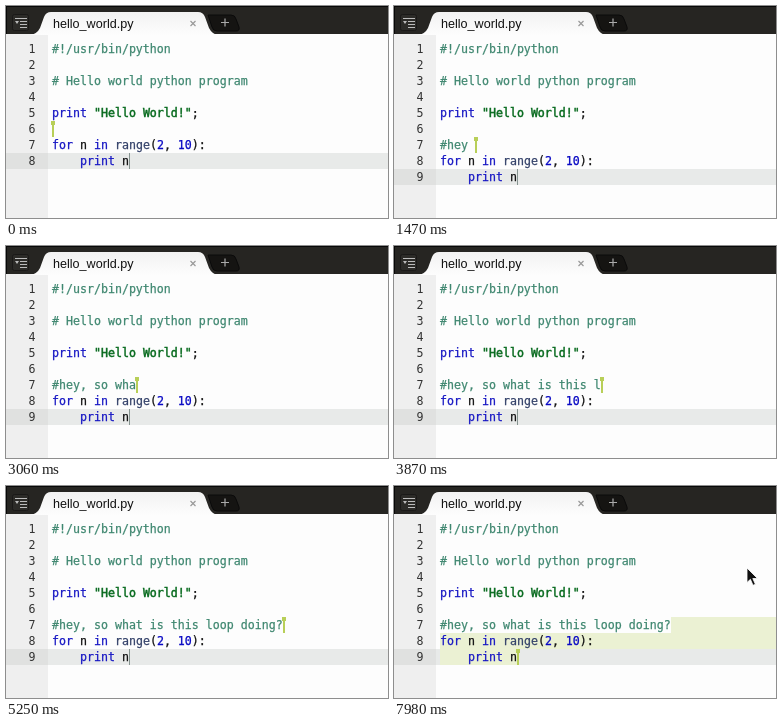
An HTML page for the animation above (8000 ms loop, 382 px wide and 212 px high).

```html
<!DOCTYPE html>
<html lang="en">
<head>
<meta charset="utf-8">
<title>Shared code editor</title>
<style>
  html, body { margin: 0; height: 100%; overflow: hidden; background: #fdfdfd; }
  svg { display: block; width: 382px; height: 212px; }
  text { white-space: pre; }
  .code text { font: 11.628px "DejaVu Sans Mono", monospace; }
  .line, .line tspan { fill: currentColor; stroke: currentColor; stroke-width: .25; }
  .line { color: #111; }
  .number { text-anchor: end; fill: #333; }
  .title { font: 12.6px "Liberation Sans", Arial, sans-serif; fill: #111; }
  .comment { color: #3f8770; }
  .keyword { color: #1818c4; }
  .line .string { color: #05691c; stroke-width: .45; }
  .digit { color: #0a0ac4; }
  .builtin { color: #34426a; }
  .selection { fill: #ebf1d3; }
  .remote { fill: #b8cf58; }
</style>
</head>
<body>
<svg viewBox="0 0 382 212">
  <defs>
    <linearGradient id="tab" x2="0" y2="1">
      <stop stop-color="#f2f2f2"/><stop offset="1" stop-color="#fdfdfd"/>
    </linearGradient>
  </defs>

  <rect width="382" height="212" fill="#fdfdfd"/>
  <rect y="28" width="42" height="184" fill="#efefef"/>
  <g id="active">
    <rect width="42" height="16" fill="#e0e1e0"/>
    <rect x="42" width="340" height="16" fill="#e8eae9"/>
  </g>
  <g id="selection" class="selection"></g>
  <g id="code" class="code"></g>
  <rect id="caret" x="123" width="1" height="16" fill="#869490"/>
  <path id="remote" class="remote" d="M-1 0h4v4h-1v12h-2v-12h-1z"/>

  <rect width="382" height="28" fill="#262522"/>
  <path d="M0 .5H382M.5 0V28" stroke="#080808"/>
  <path d="M202 9H225Q229 9 230 13L233 21Q234 25 230 25H211Q207 25 206 21Z" fill="#151412" stroke="#0a0a0a"/>
  <path d="M215 16.500h8M219 12.500v8" stroke="#aaa" stroke-width="1.200"/>
  <path d="M24 29Q31 28 34 22L38 11Q40 6 45 6H192Q197 6 199 11L203 22Q206 28 212 29Z" fill="url(#tab)"/>
  <text class="title" x="47" y="22">hello_world.py</text>
  <path d="M184.500 15l5 5m0-5l-5 5" stroke="#999" stroke-width="1.200"/>
  <rect x="6.500" y="8.500" width="16" height="16" rx="2" fill="#2c2b28" stroke="#1a1918"/>
  <path d="M9 12.500h12M14 15.500h7M14 18.500h7M14 21.500h7" stroke="#bbb"/>
  <path d="M9 15h4l-2 3z" fill="#bbb"/>

  <path id="pointer" d="M353 82v14.500l3.400-3.200l2.600 6l2.400-1l-2.600-5.800h4.700z" fill="#111" stroke="#fff" stroke-width=".8"/>
</svg>
<script>
const LOOP = 8000, LEFT = 46, CHAR = 7, ROW = 16;
const INSERT = 570, SELECT = 5940, SELECT_END = 6060, POINTER = 7980;
const $ = id => document.getElementById(id);
const rowTop = row => 35 + ROW * (row - 1);
const colX = col => LEFT + CHAR * col;
const span = (kind, text) => `<tspan class="${kind}">${text}</tspan>`;

const head = [
  span('comment', '#!/usr/bin/python'), '',
  span('comment', '# Hello world python program'), '',
  `${span('keyword', 'print')} ${span('string', '"Hello World!"')};`, ''
];
const loopLines = [
  `${span('keyword', 'for')} n ${span('keyword', 'in')} ${span('builtin', 'range')}(${span('digit', '2')}, ${span('digit', '10')}):`,
  `    ${span('keyword', 'print')} n`
];

// Bursts of keys: first and last key time, then the keys ("<" is backspace).
const bursts = [
  [930, 930, '#'], [1200, 1440, 'hey '], [2190, 2190, 's'],
  [2460, 3030, '<<, so wha'], [3100, 3220, 't i'], [3280, 3340, 's '],
  [3540, 3840, 'this l'], [4050, 4120, 'oo'], [4410, 4510, 'p '],
  [4680, 4810, 'doi'], [4980, 5050, 'ng'], [5220, 5220, '?']
];
const keys = bursts.flatMap(([start, end, text]) => [...text].map((key, i) =>
  ({ key, time: start + (end - start) * i / Math.max(1, text.length - 1) })));

function typedAt(time) {
  return keys.filter(k => k.time <= time)
    .reduce((text, { key }) => key === '<' ? text.slice(0, -1) : text + key, '');
}

function selectionBar(row, from, to) {
  return `<rect x="${from}" y="${rowTop(row)}" width="${to - from}" height="${ROW}"/>`;
}

function draw(time) {
  const inserted = time >= INSERT;
  const typed = typedAt(time);
  const lines = [...head, ...(inserted ? [span('comment', typed)] : []), ...loopLines];
  const last = lines.length;

  $('code').innerHTML = lines.map((line, i) => {
    const y = rowTop(i + 1) + 12;
    return `<text class="number" x="29.500" y="${y}">${i + 1}</text><text class="line" x="${LEFT}" y="${y}">${line}</text>`;
  }).join('');
  $('active').setAttribute('transform', `translate(0 ${rowTop(last)})`);
  $('caret').setAttribute('y', rowTop(last));

  let row = inserted ? 7 : 6, col = typed.length, bars = '';
  if (time >= SELECT) {
    const done = time >= SELECT_END;
    bars = selectionBar(7, colX(col), 382) + selectionBar(8, LEFT, done ? 382 : colX(22));
    if (done) bars += selectionBar(9, LEFT, colX(11));
    [row, col] = done ? [9, 11] : [8, 22];
  }
  $('selection').innerHTML = bars;
  $('remote').setAttribute('transform', `translate(${colX(col)} ${rowTop(row)})`);
  $('pointer').style.display = time >= POINTER ? '' : 'none';
}

const begin = performance.now();
function tick() {
  draw((performance.now() - begin) % LOOP);
  requestAnimationFrame(tick);
}
tick();
</script>
</body>
</html>
```
